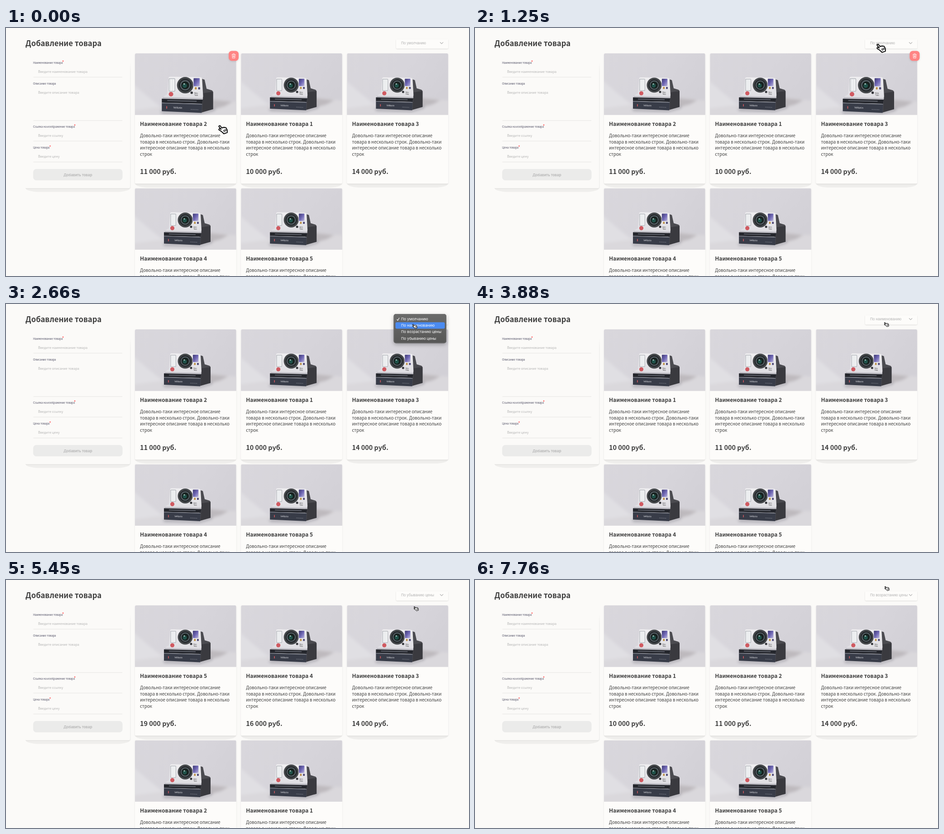
These frames come from a looping animation (1023 by 547 pixels, 8000 ms). An HTML page:

```html
<!DOCTYPE html>
<html lang="ru">
<head>
<meta charset="utf-8">
<title>Добавление товара</title>
<style>
html, body { margin: 0; width: 100%; height: 100%; overflow: hidden; background: #fbfaf8; }
svg { display: block; width: 1023px; height: 547px; }
text { font-family: "Noto Sans CJK JP", "Noto Sans CJK SC", "Noto Sans", sans-serif; fill: #3f3f3f; white-space: pre; }
.h1 { font-size: 16.65px; font-weight: 700; }
.title { font-size: 12.05px; font-weight: 700; }
.desc { font-size: 9.66px; }
.price { font-size: 14.45px; font-weight: 700; }
.label { font-size: 5.95px; fill: #49485e; }
.hint { font-size: 7.2px; fill: #b4b4b4; }
.submit { font-family: Inter, sans-serif; font-size: 8.2px; font-weight: 600; letter-spacing: -.02em; fill: #b4b4b4; text-anchor: middle; }
.sort { font-family: "Liberation Sans", sans-serif; font-size: 8.15px; fill: #b4b4b4; }
.item { font-family: Inter, sans-serif; font-size: 8.2px; fill: #fff; }
.tiny { font-family: "Liberation Sans", sans-serif; }
.card { filter: drop-shadow(0 1.8px 1.4px rgba(0, 0, 0, .09)); }
.select { filter: drop-shadow(0 1.2px .8px rgba(0, 0, 0, .12)); }
.panel { filter: drop-shadow(0 3px 4px rgba(0, 0, 0, .28)); }
</style>
</head>
<body>
<svg viewBox="0 0 1023 547" xmlns="http://www.w3.org/2000/svg">
  <defs>
    <linearGradient id="wall" x2="1" y2=".5">
      <stop offset="0" stop-color="#d9d7dc"/><stop offset=".55" stop-color="#d7d5db"/><stop offset="1" stop-color="#d2d0d6"/>
    </linearGradient>
    <linearGradient id="finder" x2="1" y2="1">
      <stop offset="0" stop-color="#3e3a72"/><stop offset=".5" stop-color="#6e66b4"/><stop offset="1" stop-color="#b9b4dc"/>
    </linearGradient>
    <linearGradient id="shell" x2="0" y2="1">
      <stop offset="0" stop-color="#f0eff1"/><stop offset="1" stop-color="#dddce1"/>
    </linearGradient>
    <linearGradient id="dark" x2="0" y2="1">
      <stop offset="0" stop-color="#6b6b6a"/><stop offset="1" stop-color="#575756"/>
    </linearGradient>
    <linearGradient id="fade" y2="1" x2="0">
      <stop offset=".06" stop-color="#000" stop-opacity="0"/><stop offset=".14" stop-color="#000" stop-opacity=".05"/>
    </linearGradient>
    <filter id="soft" x="-20%" y="-20%" width="140%" height="140%"><feGaussianBlur stdDeviation="3"/></filter>
    <clipPath id="frame"><path d="M0 135.5V3Q0 0 3 0H220.5Q223.5 0 223.5 3V135.5Z"/></clipPath>

    <g id="photo">
      <path fill="url(#wall)" d="M-5-5H230V142H-5Z"/>
      <path fill="#e0dfe3" filter="url(#soft)" d="M-5 58 30 88 60 112V142H-5Z"/>
      <path fill="#dad8dc" filter="url(#soft)" d="M-5 122 70 112 165 100 230 104V142H-5Z"/>
      <path fill="#bdb9bd" filter="url(#soft)" d="M160 98 206 103 190 112 166 119Z"/>
      <path fill="#8f8d95" filter="url(#soft)" opacity=".6" d="M62 121 144 123 170 114V121L142 129 64 127Z"/>
      <path fill="#4b4b50" d="M141 56 150 59 154 77 164 80Q167 81 167 85V118L143 125Z"/>
      <path fill="#3a3a3f" d="M147 86 167 83V118L145 124Z"/>
      <path fill="url(#shell)" d="M78 54Q79 53 82 53L140 54Q145 54 145 58L147 92 146 99 65 97 67 93 75 88Z"/>
      <path fill="#bebdc4" d="M66 94 147 96 146 99 65 97Z"/>
      <path fill="#25272d" d="M64 97 146 99 145 107 64 105Z"/>
      <path fill="#6d707a" d="M75 100 134 101.500V103L75 101.500Z"/>
      <path fill="#383c48" d="M64 105 145 107.500 144 125.500 64 122Z"/>
      <path fill="#8b8e97" d="M64 105 145 107.500V108.700L64 106.200Z"/>
      <rect x="78" y="56" width="13" height="27" rx="2" fill="#b9bcc1"/>
      <rect x="79.5" y="57.5" width="10" height="24" rx="1" fill="#f5f6f7"/>
      <path stroke="#d3d7da" stroke-width="1" d="M82 58V81M86 58V81"/>
      <circle cx="111" cy="70" r="16.5" fill="#45484b"/>
      <circle cx="111" cy="70" r="13" fill="#282c2f"/>
      <circle cx="111" cy="70" r="10" fill="#59636a"/>
      <circle cx="111" cy="70" r="8" fill="#17211f"/>
      <circle cx="110" cy="71" r="4.5" fill="#1f5149"/>
      <circle cx="109" cy="67.500" r="1.5" fill="#a8c4bc"/>
      <rect x="127" y="55" width="14" height="18" rx="1.5" fill="#dcdbe3"/>
      <rect x="128" y="56" width="12" height="16" rx="1" fill="url(#finder)"/>
      <rect x="130.5" y="74" width="3.5" height="4.5" rx="1" fill="#b98a3c"/>
      <rect x="137" y="74" width="4" height="4.5" rx="1" fill="#4f4a78"/>
      <circle cx="124" cy="85" r="2.5" fill="#34353a"/>
      <circle cx="82.5" cy="88" r="4.6" fill="#d05a61"/>
      <text class="tiny" font-size="4.2" x="129" y="87" transform="rotate(3 129 87)">Nim</text>
      <text class="tiny" font-size="4.2" x="129" y="91" transform="rotate(3 129 91)">Talo</text>
      <text class="tiny" font-size="5.4" x="87" y="116.500" style="fill:#e4e4e8" transform="rotate(2 87 116)">Veltorin</text>
      <rect x="73" y="112" width="1.8" height="5" fill="#c2565c"/>
      <path stroke="#777a84" stroke-width="1" stroke-dasharray="2 .6" d="M122 118.500 138 119.200"/>
    </g>

    <g id="trash">
      <rect width="22" height="22" rx="7" fill="#ff8484" filter="drop-shadow(0 1px 2px rgba(0,0,0,.12))"/>
      <path fill="none" stroke="#fff" stroke-width=".8" d="M6.800 8H15.200M9.400 7.700V6.300H12.600V7.700M7.600 8 8.200 16H13.800L14.400 8M9.700 9.800V14.200M11 9.800V14.200M12.300 9.800V14.200"/>
    </g>
  </defs>

  <rect width="1023" height="547" fill="#fbfaf8"/>
  <text class="h1" x="43" y="40">Добавление товара</text>
  <g id="form"></g>
  <g id="cards"></g>
  <path class="select" fill="#fdfcfa" d="M862 25H977V43Q977 45.500 974.500 45.500H864.500Q862 45.500 862 43Z"/>
  <text id="sort" class="sort" x="873" y="36"></text>
  <path fill="none" stroke="#a9a9a9" stroke-width="1.1" d="M959 31.300 962.500 34.800 966 31.300"/>

  <g id="menu">
    <rect class="panel" x="856.5" y="0" width="116.5" height="64.5" rx="5" fill="#3f3f3f"/>
    <rect x="857.2" y=".7" width="115.1" height="63.1" rx="4.4" fill="url(#dark)" stroke="#858585" stroke-width=".7"/>
    <rect id="glow" x="860.5" width="109" height="14.2" rx="3" fill="#4b8bf0"/>
    <path id="tick" fill="none" stroke="#fff" stroke-width="1.2" d="M863.600 .3 865.600 2.700 869-3"/>
    <g id="items"></g>
  </g>

  <g id="hand" stroke="#000" stroke-linejoin="round" stroke-linecap="round">
    <g transform="rotate(-16) scale(1 .94)">
      <path fill="#fff" stroke-width="1.9" d="M-4.600 3.400-8-.6C-9.600-2.600-7.200-4.400-5.400-2.800L-3.600-1-6.400-8C-7.200-10.600-4.200-11.400-3.200-9.200L-1-3.400C-.6-4.800 1.600-4.800 2-3.200 2.800-4.400 4.800-4 5-2.400 6.200-3.200 7.800-2.400 8-.8L8.800 3.800C9.200 6 8 7.400 7.800 8.600L7.600 10.200-.6 10.800C-1 8.400-3.200 6-4.600 3.400Z"/>
      <path fill="none" stroke-width="1.3" d="M.8 2.400 1.600 6.600M3.400 2 4 6.200M5.800 1.600 6.400 5.600"/>
    </g>
  </g>
</svg>

<script>
const $ = id => document.getElementById(id);
const names = ["По умолчанию", "По наименованию", "По возрастанию цены", "По убыванию цены"];
const prices = [0, 10, 11, 14, 16, 19];
const about = ["Довольно-таки интересное описание", "товара в несколько строк. Довольно-таки",
  "интересное описание товара в несколько", "строк"];
const PITCH = 14.2;

const text = (cls, x, y, s) => `<text class="${cls}" x="${x}" y="${y}">${s}</text>`;
const underside = (w, h) => `<rect x=".5" y="${h - 8}" width="${w - 1}" height="16.5" rx="30" ry="8.2" fill="#efeeec"/>`;

function buildForm() {
  const fields = [
    ["Наименование товара", "Введите наименование товара", 79, 25.5, 126],
    ["Описание товара", "Введите описание товара", 125.3, 75, 0],
    ["Ссылка на изображение товара", "Введите ссылку", 220, 25.5, 152],
    ["Цена товара", "Введите цену", 266.3, 25.5, 97.5]
  ];
  $("form").innerHTML = `<g transform="translate(43 56)">${underside(231.5, 297)}
      <rect width="232" height="298" rx="2.8" fill="#fbfaf8"/>
      <path fill="url(#fade)" d="M231 0H232.500V296Q232 299 229 299H3Q0 299 0 297H229Q231 297 231 294Z"/></g>` +
    fields.map(([name, hint, y, h, star]) =>
      text("label", 60, y - .3, name) +
      (star ? `<circle cx="${star}" cy="${y - 6}" r="1.4" fill="#ff6b6b"/>` : "") +
      `<path stroke="#e6e5e3" d="M60.500 ${y + 3.8 + h}H257"/>` +
      text("hint", 71, y + 19.5, hint)).join("") +
    `<rect x="60" y="311" width="197.5" height="25" rx="7" fill="#ebebea"/>` +
    text("submit", 158.7, 327, "Добавить товар");
}

function buildCards() {
  let html = "";
  for (let i = 0; i < 5; i++) {
    const x = 285 + i % 3 * 234.2, y = i < 3 ? 56 : 353.4;
    html += `<g transform="translate(${x} ${y})">${underside(223.7, 287.3)}
      <rect class="card" width="223.7" height="287.3" rx="2.8" fill="#fdfcfa"/>
      <g clip-path="url(#frame)"><use id="pic${i}" href="#photo"/></g>
      ${text("title", 11, 159.6, "")}
      ${about.map((s, k) => text("desc", 11, 185 + k * 13.6, s)).join("")}
      ${text("price", 11, 266.3, "")}
      <use id="bin${i}" href="#trash" x="207" y="-5.5"/></g>`;
  }
  $("cards").innerHTML = html;
}

buildForm();
buildCards();
$("items").innerHTML = names.map((s, i) => text("item", 873, 14 + i * PITCH, s)).join("");
const titles = document.querySelectorAll(".title"), costs = document.querySelectorAll(".price");

// at: cursor, size: cursor scale, zoom/bin: first three cards, open/lit: menu rows (-1 is none)
const start = { at: [479, 223.5], size: 1, zoom: [1, 0, 0], bin: [1, 0, 0],
  order: [2, 1, 3, 4, 5], pick: 0, open: -1, lit: -1, fade: 1 };
const steps = [
  [120, { at: [590, 200] }],
  [240, { at: [684, 181.5] }],
  [390, { at: [662, 181], zoom: [.5, .5, 0], bin: [0, 1, 0] }],
  [540, { zoom: [0, 1, 0] }],
  [810, { at: [752, 148] }],
  [930, { at: [851.5, 109] }],
  [1070, { at: [882, 78], zoom: [0, .5, .5], bin: [0, 0, 0] }],
  [1250, { at: [897, 44], zoom: [0, 0, 1], bin: [0, 0, 1] }],
  [1400, { at: [898, 40], size: .75, zoom: [0, 0, .5], bin: [0, 0, 0] }],
  [1550, { at: [898, 38.5], size: .52, zoom: [0, 0, 0] }],
  [1910, { open: 0, lit: 0 }],
  [2270, { at: [899, 40] }],
  [2370, { at: [900, 43], lit: 1 }],
  [2460, { at: [901, 46] }],
  [2560, { at: [902, 48] }],
  [2660, { at: [903, 49] }],
  [3230, { lit: -1 }],
  [3350, { open: -1, pick: 1, order: [1, 2, 3, 4, 5] }],
  [3760, { at: [906, 46.5] }],
  [3880, { at: [909, 45] }],
  [4090, { open: 1, lit: 1 }],
  [4360, { at: [908, 49], lit: 2 }],
  [4470, { at: [907, 55] }],
  [4570, { at: [906, 60], lit: 3 }],
  [4680, { at: [906, 63] }],
  [5010, { lit: -1 }],
  [5130, { lit: 3 }],
  [5240, { fade: .5 }],
  [5350, { open: -1, fade: 1, pick: 3 }],
  [5450, { order: [5, 4, 3, 2, 1] }],
  [6020, { at: [905.5, 61] }],
  [6170, { at: [907, 54] }],
  [6280, { at: [908, 48] }],
  [6390, { at: [909, 44] }],
  [6500, { open: 3, lit: 3 }],
  [6860, { at: [910, 27] }],
  [6950, { at: [910.5, 19], lit: 2 }],
  [7160, { at: [910, 18.5] }],
  [7370, { lit: -1 }],
  [7520, { lit: 2 }],
  [7640, { fade: .5 }],
  [7760, { open: -1, fade: 1, pick: 2, order: [1, 2, 3, 4, 5] }]
];

function draw(s) {
  $("hand").setAttribute("transform", `translate(${s.at}) scale(${s.size})`);
  for (let i = 0; i < 5; i++) {
    const k = 1 + .1 * (s.zoom[i] || 0);
    $("pic" + i).setAttribute("transform", `translate(111.8 67.8) scale(${k}) translate(-111.8 -67.8)`);
    $("bin" + i).setAttribute("opacity", s.bin[i] || 0);
    titles[i].textContent = "Наименование товара " + s.order[i];
    costs[i].textContent = prices[s.order[i]] + " 000 руб.";
  }
  $("sort").textContent = names[s.pick];
  $("menu").style.display = s.open < 0 ? "none" : "";
  $("menu").setAttribute("opacity", s.fade);
  $("menu").setAttribute("transform", `translate(0 ${22 - PITCH * s.open})`);
  $("tick").setAttribute("transform", `translate(0 ${11.5 + PITCH * s.open})`);
  $("glow").style.display = s.lit < 0 ? "none" : "";
  $("glow").setAttribute("y", 4 + PITCH * s.lit);
}

let shown = -1;
function tick() {
  const t = performance.now() % 8000;
  const done = steps.filter(([at]) => at <= t);
  if (done.length !== shown) {
    shown = done.length;
    draw(Object.assign({}, start, ...done.map(([, change]) => change)));
  }
  requestAnimationFrame(tick);
}
tick();
</script>
</body>
</html>
```
